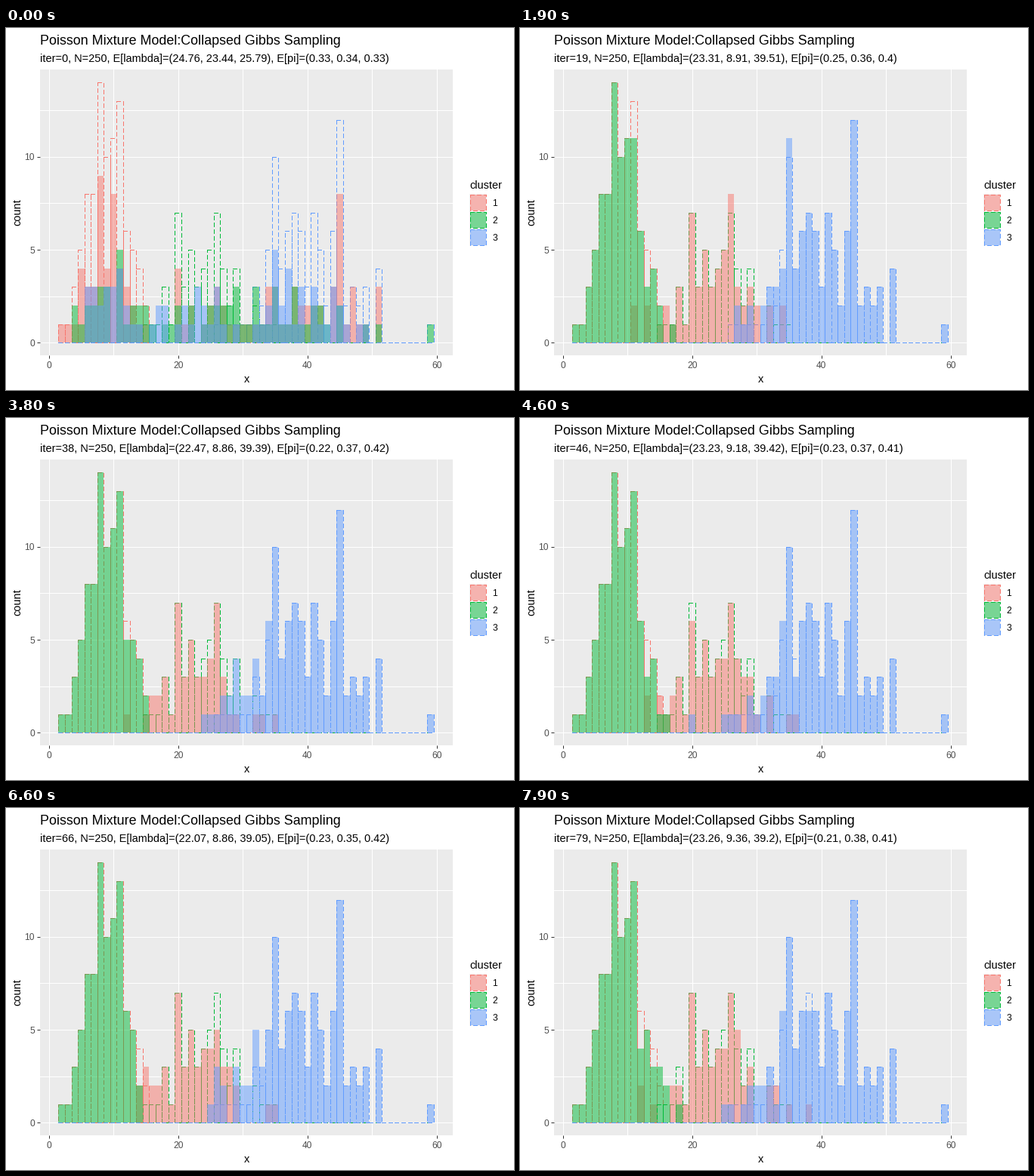
A matplotlib script for the animation above (8000 ms loop, 672 px wide and 480 px high).

```python
import numpy as np
import matplotlib.pyplot as plt
from matplotlib.animation import FuncAnimation
from matplotlib.collections import PolyCollection
from matplotlib.patches import Rectangle

plt.rcParams["font.family"] = "Liberation Sans"

W, H, PT = 672, 480, 0.75          # stage in pixels, points per pixel
FRAMES, INTERVAL, BURN_IN = 80, 100, 7
COLORS = ["#F8766D", "#00BA38", "#619CFF"]
DASH = (0, (5, 3))

# The data set: how often each x occurs
xs = np.arange(2, 60)
edges = np.arange(1.5, 60)
total = np.zeros(len(xs), int)
total[:50] = [1, 1, 3, 5, 8, 8, 14, 10, 11, 13, 6, 5, 4, 3, 2, 2, 3,
              1, 7, 3, 5, 3, 4, 5, 8, 5, 3, 5, 2, 2, 5, 3, 6, 11,
              4, 6, 7, 6, 3, 7, 5, 2, 6, 12, 2, 3, 2, 3, 0, 4]
total[-1] = 1

# Key points of the chain: iteration, then E[lambda], then E[pi]
CHAIN = np.array([
    [0, 24.76, 23.44, 25.79, 0.33, 0.34, 0.33],
    [7, 23, 9.13, 39.46, 0.23, 0.36, 0.41],
    [19, 23.31, 8.91, 39.51, 0.25, 0.36, 0.4],
    [30, 22.56, 9.07, 38.82, 0.21, 0.36, 0.43],
    [46, 23.23, 9.18, 39.42, 0.23, 0.37, 0.41],
    [66, 22.07, 8.86, 39.05, 0.23, 0.35, 0.42],
    [79, 23.26, 9.36, 39.2, 0.21, 0.38, 0.41],
])
STEPS = CHAIN[:, 0]


def posterior(lam, pi):
    """Cluster probabilities of every x in a Poisson mixture."""
    logp = np.log(pi) - lam + xs[:, None] * np.log(lam)
    p = np.exp(logp - logp.max(axis=1, keepdims=True))
    return p / p.sum(axis=1, keepdims=True)


def estimates(it, rng):
    """Follow the key points, wandering in between."""
    t = it
    if it < BURN_IN:
        t = BURN_IN * (1 - (1 - it / BURN_IN) ** 2)
    values = np.array([np.interp(t, STEPS, col) for col in CHAIN.T[1:]])
    loose = min(np.abs(STEPS - it).min(), 1)
    drift = rng.normal(0, 0.01, 3)
    lam = values[:3] + loose * rng.normal(0, (0.4, 0.2, 0.3))
    return lam, values[3:] + loose * (drift - drift.mean())


def state(it):
    """Estimates and sampled cluster counts of one iteration."""
    rng = np.random.default_rng(100 + it)
    lam, pi = estimates(it, rng)
    p = posterior(lam, pi) if it else np.tile(pi / pi.sum(), (len(xs), 1))
    return lam, pi, rng.multinomial(total, p).T


def listing(values):
    return ", ".join(f"{round(v, 2):g}" for v in values)


fig = plt.figure(figsize=(W / 96, H / 96), dpi=96, facecolor="white")

# Text and legend, in pixels from the top left
stage = fig.add_axes([0, 0, 1, 1])
stage.set(xlim=(0, W), ylim=(H, 0))
stage.axis("off")


def label(x, y, text, px=14.5, **kw):
    return stage.text(x, y, text, fontsize=px * PT, **kw)


def box(x, y, w, h, **kw):
    stage.add_patch(Rectangle((x, y), w, h, antialiased=False, **kw))


label(45, 22, "Poisson Mixture Model:Collapsed Gibbs Sampling", 17.85)
sub = label(45, 45, "")
label(318, 470, "x", ha="center")
label(15, 244.5, "count", ha="center", va="center", rotation=90)
label(613, 213, "cluster")
for i, color in enumerate(COLORS):
    top = 220 + 23 * i
    box(613, top, 23, 23, fc="#F2F2F2", lw=0)
    box(614, top + 1, 21, 21, fc="none", ec=color, lw=PT, ls=DASH)
    box(614, top + 1, 21, 21, fc=color, alpha=0.5, lw=0)
    label(643, top + 16, str(i + 1), 12)

# Panel
ax = fig.add_axes([44.6 / W, 1 - 434.45 / H, 546 / W, 379.3 / H])
ax.set_facecolor("#EBEBEB")
ax.set_xticks([0, 20, 40, 60])
ax.set_xticks([10, 30, 50], minor=True)
ax.set_yticks([0, 5, 10])
ax.set_yticks([2.5, 7.5, 12.5], minor=True)
ax.tick_params(length=2.75, width=PT, color="#333333", pad=2.2,
               labelcolor="#4D4D4D", labelsize=12 * PT)
ax.tick_params(axis="x", pad=2.9)
ax.tick_params(which="minor", length=0)
ax.grid(which="both", color="white", lw=PT)
ax.set_axisbelow(True)
for spine in ax.spines.values():
    spine.set_visible(False)


def outline(x, n):
    """Closed bar outline, or a single line for an empty bin."""
    a, b = x - 0.5, x + 0.5
    if n == 0:
        return [(a, 0), (b, 0)]
    return [(a, n), (b, n), (b, 0), (a, 0), (a, n)]


# True groups: the expected split of each bin
share = posterior(np.array([9.1, 25, 40]), np.array([0.37, 0.25, 0.38]))
truth = np.rint(share.T * total).astype(int)
for counts, color in zip(truth, COLORS):
    ax.add_collection(PolyCollection(
        [outline(x, n) for x, n in zip(xs, counts)], closed=False,
        facecolors="none", edgecolors=color, linewidths=PT,
        linestyles=[DASH], antialiaseds=False, snap=True, zorder=2),
        autolim=False)

fills = [ax.stairs(np.zeros(len(xs)), edges, fill=True, color=c, alpha=0.5,
                   lw=0, antialiased=False, zorder=3) for c in COLORS]
ax.set(xlim=(-1.4, 62.4), ylim=(-0.7, 14.7))


def draw(it):
    lam, pi, counts = state(it)
    for fill, c in zip(fills, counts):
        fill.set_data(values=c)
    sub.set_text(f"iter={it}, N={total.sum()}, "
                 f"E[lambda]=({listing(lam)}), E[pi]=({listing(pi)})")
    return [*fills, sub]


anim = FuncAnimation(fig, draw, frames=FRAMES, interval=INTERVAL,
                     repeat=True, repeat_delay=0, blit=False)
plt.show()
```
